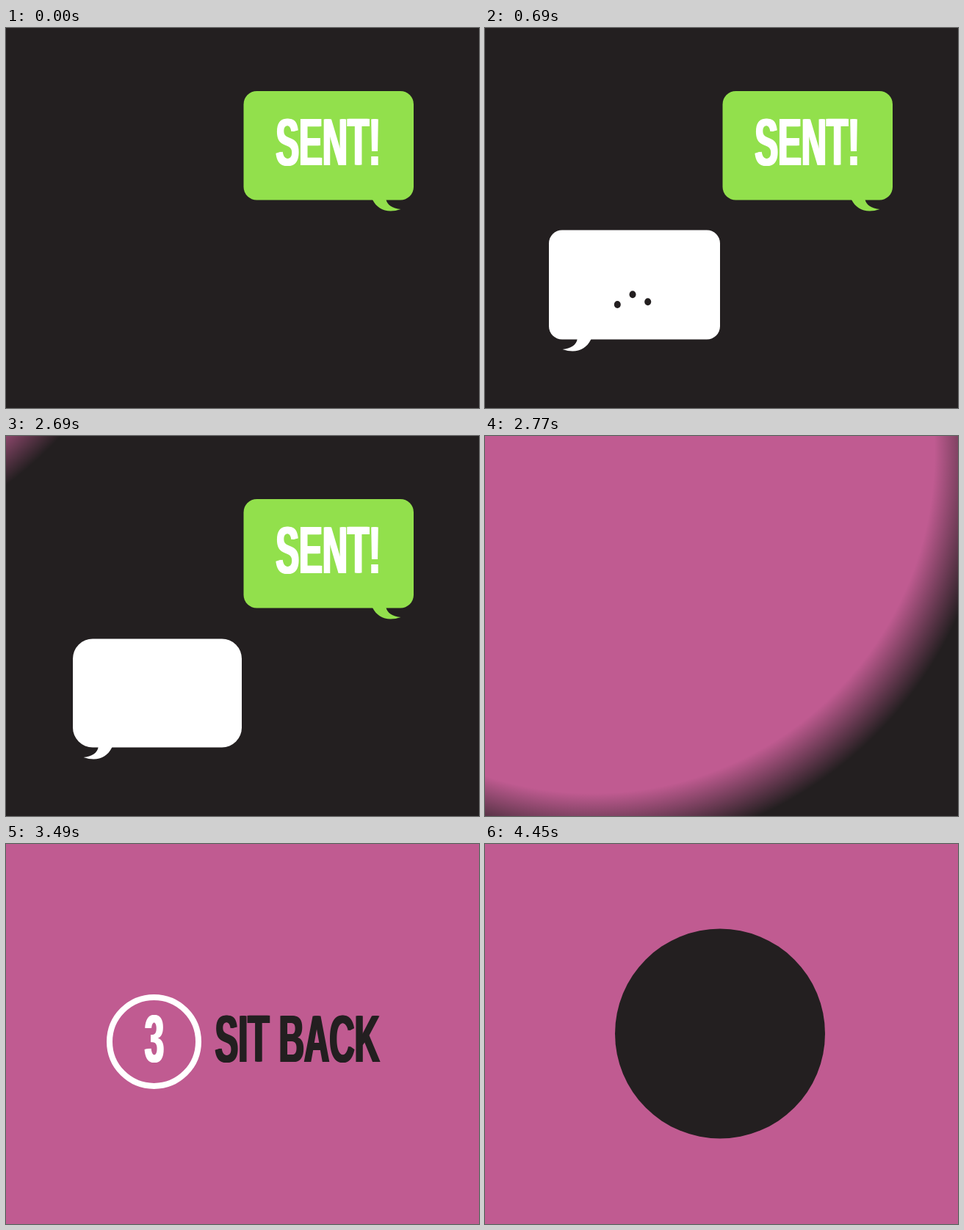
Write an HTML page with a canvas that moves like this. It is 644 px wide and 518 px high and loops after 4.53 s.

```html
<!DOCTYPE html>
<html lang="en">
<head>
<meta charset="utf-8">
<title>Sent, sit back</title>
<style>
  html, body { margin: 0; width: 100%; height: 100%; overflow: hidden; background: #231f20; }
  canvas { display: block; }
</style>
</head>
<body>
<canvas id="stage" width="644" height="518"></canvas>
<script>
const W = 644, H = 518, LOOP = 4530, STEP = 80;
const DARK = '#231f20', GREEN = '#92e04c', PINK = '#c05b91', WHITE = '#fff';
const ctx = document.getElementById('stage').getContext('2d');

const clamp = x => Math.max(0, Math.min(1, x));

// Piecewise linear keys: [time, value], ...
function keyed(t, ...keys) {
  if (t <= keys[0][0]) return keys[0][1];
  for (let i = 1; i < keys.length; i++) {
    const [t0, a] = keys[i - 1], [t1, b] = keys[i];
    if (t <= t1) return a + (b - a) * (t - t0) / (t1 - t0);
  }
  return keys[keys.length - 1][1];
}

// The motion runs in 80 ms steps, with a long hold before the exit.
function stepTime(t) {
  if (t < 50) return 0;
  if (t >= 3490 && t < 4210) return 3490;
  return 50 + Math.floor((t - 50) / STEP) * STEP;
}

function fill(color) {
  ctx.fillStyle = color;
  ctx.fillRect(0, 0, W, H);
}

function ellipse(x, y, rx, ry, color) {
  ctx.fillStyle = color;
  ctx.beginPath();
  ctx.ellipse(x, y, rx, ry, 0, 0, 7);
  ctx.fill();
}

// Condensed poster face: narrow bold with thickened stems.
function label(str, x, y, color, align = 'left') {
  ctx.save();
  ctx.translate(x, y);
  ctx.scale(.522, 1);
  ctx.font = 'bold 91px "Liberation Sans", Arial, sans-serif';
  ctx.textAlign = align;
  ctx.fillStyle = color;
  for (const dx of [-2.5, 0, 2.5]) ctx.fillText(str, dx, 0);
  ctx.restore();
}

// dir 1: tail points right; -1: left. The tail hangs from (tx, ty).
function bubble(x0, y0, x1, y1, r, tx, ty, dir, color) {
  ctx.fillStyle = color;
  ctx.beginPath();
  ctx.roundRect(x0, y0, x1 - x0, y1 - y0, r);
  ctx.fill();
  ctx.save();
  ctx.translate(tx, ty);
  ctx.scale(dir, 1);
  ctx.beginPath();
  ctx.moveTo(-1, -2);
  ctx.lineTo(0, 0);
  ctx.bezierCurveTo(7, 14, 21, 19, 38.5, 13);
  ctx.bezierCurveTo(27, 12, 20, 7, 18.5, 0);
  ctx.lineTo(18.5, -2);
  ctx.fill();
  ctx.restore();
}

function typingDots(t) {
  const size = keyed(t, [2530, 1], [2690, 0]);
  if (!size) return;
  for (let i = 0; i < 3; i++) {
    const phase = (t - 175 - i * 240 + 2080) % 1040 / 480;
    const hop = phase < 1 ? 56 * phase * (1 - phase) : 0;
    ellipse(180.3 + i * 20.7, 377 - hop, 4.5 * size, 5 * size, DARK);
  }
}

function chat(t) {
  fill(DARK);
  bubble(323.5, 86, 555, 234.5, 18, 499, 234, 1, GREEN);
  label('SENT!', 367.4, 187, WHITE);

  const pop = keyed(t, [0, 0], [50, .15], [130, .65], [210, 1.04], [290, 1.13], [370, 1.03], [450, .98], [530, 1]);
  if (!pop) return;
  const soft = clamp((t - 2610) / STEP);
  ctx.save();
  ctx.translate(203, 359);
  ctx.scale(pop, pop);
  ctx.translate(-203, -359);
  bubble(87 + 4 * soft, 275.5 + soft, 320 + soft, 424.5, 18 + 9 * soft, 144, 425, -1, WHITE);
  typingDots(t);
  ctx.restore();
}

// Soft pink disc sweeping in from the top left corner.
function sweep(t) {
  const d = t - 2690;
  if (d < 0) return;
  const x = -325 + 5.9 * d, y = -370 + 4.9 * d;
  const g = ctx.createRadialGradient(x, y, 465, x, y, 545);
  g.addColorStop(0, PINK);
  g.addColorStop(1, PINK + '00');
  fill(g);
}

function sitBack(t) {
  fill(PINK);
  const size = keyed(t, [4130, 1], [4210, 1.04], [4290, 1.085], [4370, .5], [4450, 0]);
  const drop = tau => 330 * Math.exp((2850 - t) / tau);
  const ringDrop = drop(94.8), textDrop = drop(99.4);
  if (size) {
    ctx.save();
    ctx.translate(322, 269);
    ctx.scale(size, size);
    ctx.translate(-322, -269);
    ctx.strokeStyle = WHITE;
    ctx.lineWidth = 8;
    ctx.beginPath();
    ctx.arc(201.5, 269 + ringDrop, 60.5, 0, 7);
    ctx.stroke();
    label('3', 202 - Math.min(3, ringDrop * .04), 297 + ringDrop, WHITE, 'center');
    label('SIT BACK', 284.5, 296.5 + textDrop, DARK);
    ctx.restore();
  }
  const r = keyed(t, [4290, 0], [4370, 45], [4450, 143]);
  if (r) ellipse(320, 258.5, r, r, DARK);
}

function draw(now) {
  const t = stepTime(now % LOOP);
  if (t < 2850) {
    chat(t);
    sweep(t);
  } else {
    sitBack(t);
  }
}

const start = performance.now();
function tick() {
  draw(performance.now() - start);
  requestAnimationFrame(tick);
}
tick();
</script>
</body>
</html>
```
